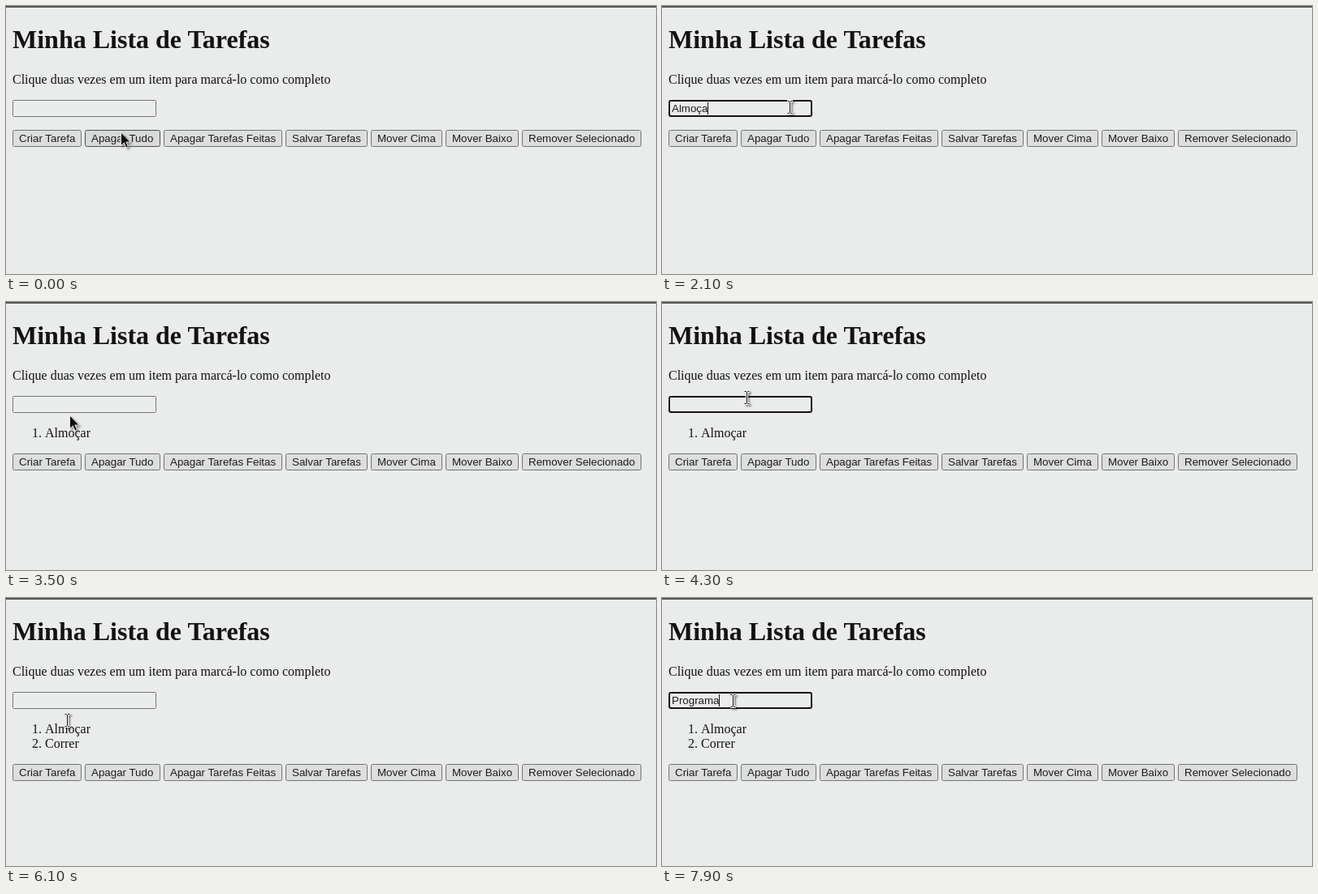
An HTML page that plays this animation: 800 px wide and 331 px high, repeating every 8 s.

```html
<!DOCTYPE html>
<html lang="pt">
<head>
<meta charset="utf-8">
<title>Minha Lista de Tarefas</title>
<style>
  html, body { margin: 0; width: 100%; height: 100%; overflow: hidden; background: #eaebeb; }
  svg { display: block; }
  text { font: 16px "Liberation Serif", serif; fill: #121212; }
  .title { font-size: 32px; font-weight: bold; }
  .ui { font: 13.333px "Liberation Sans", sans-serif; fill: #1c1c1c; white-space: pre; }
  .button rect { fill: #dddede; stroke: #747474; }
  .button.hover rect { fill: #d8d9d9; stroke: #4f4f4f; }
  .button.pressed rect { fill: #e2e3e3; stroke: #8d8d8d; }
  .button.pressed text { fill: #333; }
  #field { fill: #ebecec; stroke: #767676; }
  #field.focused { stroke: #151515; stroke-width: 2; }
  #pointer { filter: drop-shadow(2px 2px 1px #0006); }
</style>
</head>
<body>
<svg width="800" height="331" viewBox="0 0 800 331">
  <rect width="800" height="2" fill="#565656"/>
  <text class="title" x="8" y="52">Minha Lista de Tarefas</text>
  <text x="8" y="96">Clique duas vezes em um item para marcá-lo como completo</text>
  <rect id="field"/>
  <text id="typed" class="ui" x="12" y="131"></text>
  <rect id="caret" y="119" width="1" height="15" fill="#111"/>
  <g class="item"><text x="32" y="167">1.</text><text x="48" y="167">Almoçar</text></g>
  <g class="item"><text x="32" y="185">2.</text><text x="48" y="185">Correr</text></g>
  <g id="buttons"></g>
  <g id="pointer">
    <path id="arrow" d="M0 0V16.5L3.8 13L6.4 19L9 17.9L6.4 12H11.6Z" fill="#0a0a0a" stroke="#f6f6f6" stroke-width=".9"/>
    <g id="beam" fill="none">
      <path d="M-3.5 -7.5H3.5M0 -7.5V7.5M-3.5 7.5H3.5" stroke="#f4f4f4" stroke-width="3"/>
      <path d="M-3 -7.5H-1L0 -6.5L1 -7.5H3M0 -6.5V6.5M-3 7.5H-1L0 6.5L1 7.5H3" stroke="#111"/>
    </g>
  </g>
</svg>
<script>
const LOOP = 8000;
const $ = id => document.getElementById(id);
const items = document.querySelectorAll(".item");

const buttons = [
  ["Criar Tarefa", 8, 85], ["Apagar Tudo", 97, 93], ["Apagar Tarefas Feitas", 194, 146],
  ["Salvar Tarefas", 344, 101], ["Mover Cima", 449, 88], ["Mover Baixo", 541, 90],
  ["Remover Selecionado", 635, 147]
].map(([label, x, width]) => ({ label, x, width }));

$("buttons").innerHTML = buttons.map(b => `<g class="button">
  <rect x="${b.x + .5}" y=".5" width="${b.width - 1}" height="20" rx="2"/>
  <text class="ui" x="${b.x + 8}" y="15">${b.label}</text></g>`).join("");
buttons.forEach((b, i) => b.node = $("buttons").children[i]);

// Each track holds [start time, ...values]; values stay until the next entry.
const typing = [
  [0, ""], [1200, "A"], [1400, "Al"], [1500, "Alm"], [1800, "Almo"],
  [2000, "Almoç"], [2100, "Almoça"], [2300, "Almoçar"], [3400, ""],
  [4600, "C"], [4700, "Co"], [4800, "Cor"], [5000, "Corr"], [5100, "Corre"], [5300, "Correr"],
  [5900, ""], [7000, "P"], [7100, "Pr"], [7200, "Pro"], [7400, "Prog"], [7500, "Progr"],
  [7800, "Program"], [7900, "Programa"]
];
const focus = [[0, false], [500, true], [3200, false], [3800, true], [5800, false], [6400, true]];
const listLength = [[0, 0], [3400, 1], [5900, 2]];
const press = [[0, false], [3200, true], [3400, false], [5800, true], [5900, false]];
const pointer = [
  [0, 141, 156, "arrow"], [100, 142, 157, "arrow"], [300, 146, 151, "arrow"],
  [400, 152, 137, "arrow"], [500, 157, 125, "beam"],
  [2900, 132, 130, "beam"], [3000, 88, 148, "arrow"], [3200, 65, 156, "arrow"],
  [3400, 66, 156, "beam"], [3500, 78, 140, "arrow"], [3600, 93, 121, "beam"],
  [3700, 103, 112, "arrow"], [3800, 104, 117, "beam"], [4000, 104, 118, "beam"],
  [5300, 96, 132, "beam"], [5400, 72, 168, "beam"], [5500, 51, 203, "arrow"],
  [5600, 46, 210, "arrow"], [5700, 50, 203, "arrow"], [5800, 53, 198, "arrow"],
  [6000, 65, 175, "beam"], [6100, 75, 151, "beam"],
  [6300, 83, 134, "beam"], [6400, 87, 127, "beam"]
];
const at = (track, t) => track.findLast(entry => entry[0] <= t);

function setBox(node, x, y, width, height, rx) {
  Object.entries({ x, y, width, height, rx }).forEach(([k, v]) => node.setAttribute(k, v));
}

function draw(t) {
  const [typedAt, text] = at(typing, t);
  const [focusedAt, focused] = at(focus, t);
  const count = at(listLength, t)[1];
  const pressed = at(press, t)[1];
  const [, px, py, kind] = at(pointer, t);
  const top = [153, 187, 205][count];

  $("field").classList.toggle("focused", focused);
  if (focused) setBox($("field"), 9, 117, 175, 19, 2);
  else setBox($("field"), 8.5, 116.5, 176, 20, 1);

  $("typed").textContent = text;
  const textWidth = text ? $("typed").getComputedTextLength() : 0;
  const sinceInput = t - Math.max(typedAt, focusedAt);
  $("caret").setAttribute("x", Math.floor(12 + textWidth));
  $("caret").style.display = focused && sinceInput % 1000 < 500 ? "" : "none";

  items.forEach((item, i) => item.style.display = i < count ? "" : "none");
  $("buttons").setAttribute("transform", `translate(0 ${top})`);
  for (const b of buttons) {
    const over = kind === "arrow" && px >= b.x && px < b.x + b.width && py >= top && py < top + 21;
    b.node.classList.toggle("hover", over);
    b.node.classList.toggle("pressed", over && pressed);
  }

  $("pointer").setAttribute("transform", `translate(${px + .5} ${py})`);
  for (const shape of ["arrow", "beam"]) $(shape).style.display = shape === kind ? "" : "none";
}

const start = performance.now();
function tick() {
  draw((performance.now() - start) % LOOP);
  requestAnimationFrame(tick);
}
tick();
</script>
</body>
</html>
```
